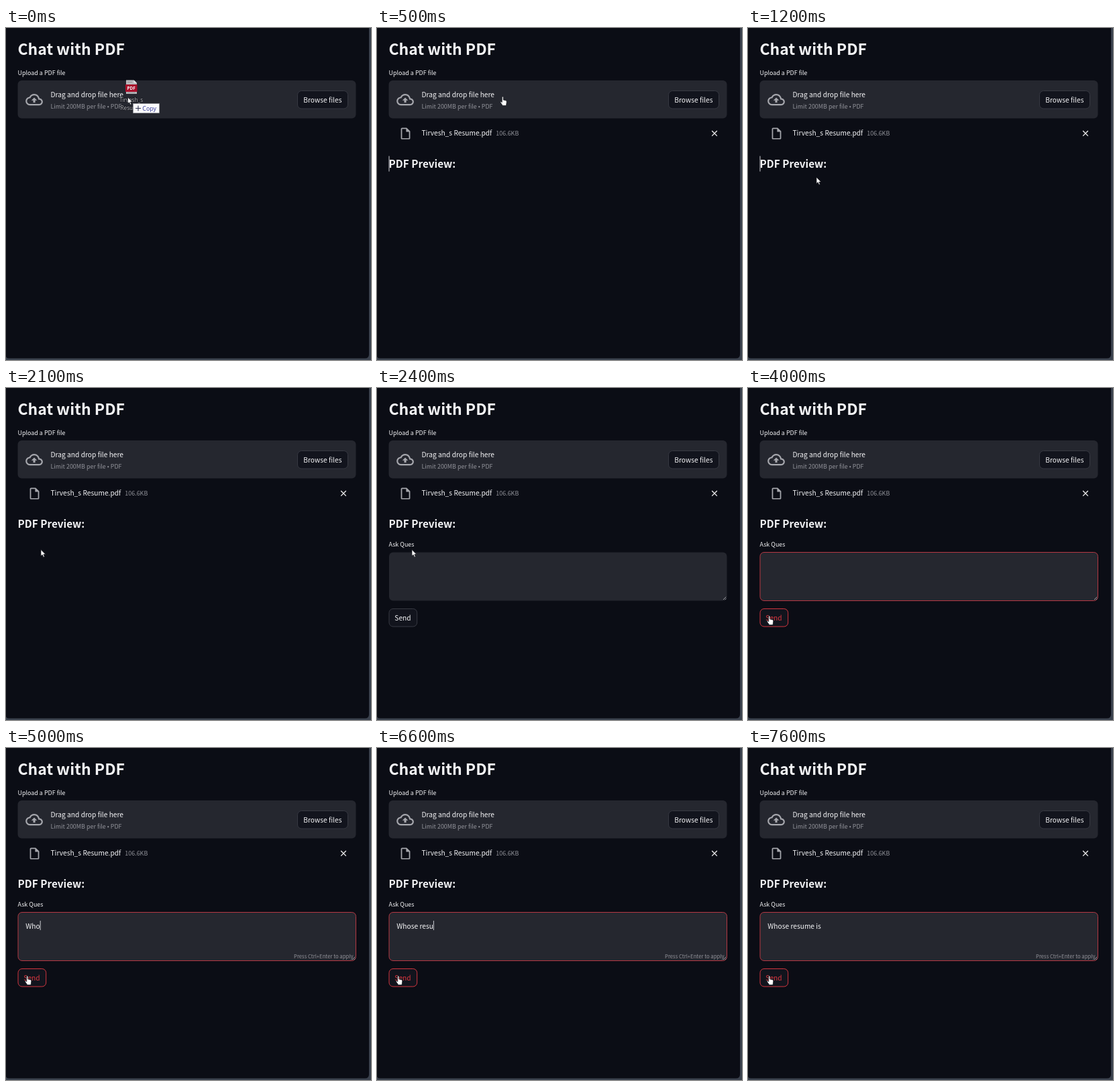
Animation, 544 px wide and 494 px high, one loop 8000 ms. Source, as an HTML page:

```html
<!DOCTYPE html>
<html lang="en">
<head>
<meta charset="utf-8">
<title>Chat with PDF</title>
<style>
  html, body { margin: 0; width: 100%; height: 100%; overflow: hidden; background: #3a414d; }
  svg { display: block; width: 544px; height: 494px; }
  text { font: 10.22px "Noto Sans CJK JP", "Noto Sans CJK SC", "Noto Sans", sans-serif; fill: #f4f4f6; white-space: pre; }
  text.title { font-size: 23px; font-weight: 700; }
  text.head { font-size: 15.35px; font-weight: 700; }
  text.small { font-size: 8.95px; }
  text.hint { font-size: 7.72px; }
  text.sys { font: 8.2px "Open Sans", "Noto Sans", sans-serif; }
  text.dim { fill: #92939a; }
  .icon { fill: #a6a7ad; }
  .panel { fill: #25272f; }
  .button { fill: #12141d; stroke: #373942; }
  .caret { fill: #c9cacf; }
  .focus { stroke: #b43843; }
  .hover .button { stroke: #d0353f; }
  .hover text { fill: #d9363f; }
  .pointer path { fill: #fff; stroke: #15161c; stroke-width: .7; }
</style>
</head>
<body>
<svg viewBox="0 0 544 494">
  <path fill="#0b0d15" d="M0 0H541V485.5Q541 491.5 535 491.5H4Q1 491.5 0 489Z"/>
  <text class="title" x="17.5" y="40">Chat with PDF</text>
  <text class="small" x="17.5" y="70">Upload a PDF file</text>

  <rect class="panel" x="17.5" y="78" width="504" height="56.5" rx="6"/>
  <path class="icon" transform="translate(29.2 93.8) scale(1.07)" d="M19.35 10.04C18.67 6.59 15.64 4 12 4 9.11 4 6.6 5.64 5.35 8.04 2.34 8.36 0 10.91 0 14c0 3.31 2.69 6 6 6h13c2.76 0 5-2.24 5-5 0-2.64-2.05-4.78-4.65-4.96zM19 18H6c-2.21 0-4-1.79-4-4 0-2.05 1.53-3.76 3.56-3.97l1.07-.11.5-.95C8.08 7.14 9.94 6 12 6c2.62 0 4.88 1.86 5.39 4.43l.3 1.5 1.53.11c1.56.1 2.78 1.41 2.78 2.96 0 1.65-1.35 3-3 3zM8 13h2.55v3h2.9v-3H16l-4-4z"/>
  <text x="66.5" y="102.8">Drag and drop file here</text>
  <text class="small dim" x="66.5" y="120">Limit 200MB per file • PDF</text>
  <rect class="button" x="434.5" y="93.5" width="75" height="26.5" rx="6"/>
  <text x="443.3" y="110.6">Browse files</text>

  <g id="file">
    <path class="icon" transform="translate(32.2 146.7) scale(.86)" d="M14 2H6c-1.1 0-2 .9-2 2v16c0 1.1.9 2 2 2h12c1.1 0 2-.9 2-2V8zM6 20V4h7v5h5v11z"/>
    <text x="66.5" y="160.2">Tirvesh_s Resume.pdf</text>
    <text class="small dim" x="177.3" y="160.2">106.6KB</text>
    <path d="M499.2 153l7.6 7.6m0-7.6l-7.6 7.6" stroke="#f4f4f6" stroke-width="1.3"/>
  </g>
  <text id="preview" class="head" x="17.5" y="208">PDF Preview:</text>
  <rect id="headCaret" class="caret" x="17.5" y="190.5" width="1" height="23"/>

  <g id="form">
    <text class="small" x="17.5" y="236.3">Ask Ques</text>
    <rect id="box" class="panel" x="18" y="244.5" width="503.5" height="72" rx="6"/>
    <path d="M516 315l4.2-4.2M518.6 315.2l1.8-1.8" stroke="#b9babf" stroke-width=".8"/>
    <text id="question" x="29.3" y="268.6"></text>
    <rect id="caret" class="caret" y="257" width="1" height="14"/>
    <text id="hint" class="hint dim" x="517.5" y="312.8" text-anchor="end">Press Ctrl+Enter to apply</text>
    <g id="send">
      <rect class="button" x="18" y="328.5" width="41.7" height="26.5" rx="6"/>
      <text x="26.3" y="345.8">Send</text>
    </g>
  </g>

  <g id="drag">
    <path fill="#b9babd" d="M179 77.5H190.5L195 82V98H179Z"/>
    <path fill="#e4e5e7" d="M190.5 77.5V82H195Z"/>
    <path stroke="#85868b" stroke-width=".7" d="M181 80.5h7M181 96.3h12"/>
    <rect x="178" y="84" width="17.5" height="11" fill="#a90f2b"/>
    <text class="sys" x="186.7" y="92.1" text-anchor="middle" style="font-size:6.4px;font-weight:700">PDF</text>
    <g opacity=".68" stroke="#101117" stroke-width="1.4" paint-order="stroke">
      <text class="sys" x="186.5" y="110" text-anchor="middle">Tirvesh_s</text>
      <text class="sys" x="170.5" y="121.8">Resu</text>
    </g>
    <rect x="189.5" y="112.5" width="39" height="14" fill="#fbfbfd" stroke="#8f9097" stroke-width=".6"/>
    <path d="M193 119.5h8M197 115.5v8" stroke="#30344f" stroke-width="1.1"/>
    <text class="sys" x="203.3" y="122.8" style="font-size:8.9px;fill:#2c3192">Copy</text>
  </g>

  <g id="pointer" class="pointer">
    <path id="arrow" d="M0 0V9.6L2.2 7.6 3.8 11.2 5.4 10.5 3.9 7H6.9Z"/>
    <path id="hand" d="M2.8 1.2Q2.8 0 3.8 0T4.8 1.2V5L8.5 5.8Q10 6.2 9.8 8L9 13.5H3.8L.4 8.6Q0 7.4 1.4 7.6L2.8 8.6Z"/>
    <path id="beam" d="M0 0h3M1.5 0v11M0 11h3" style="stroke:#e8e8ea;stroke-width:1"/>
  </g>
</svg>
<script>
const LOOP = 8000;
const el = id => document.getElementById(id);
const show = (id, on) => { el(id).style.display = on ? "" : "none"; };
const latest = (steps, t) => steps.findLast(step => step[0] <= t);

// time, shape, x, y
const pointerSteps = [
  [0, "arrow", 181.5, 103], [100, "hand", 183.5, 102],
  [900, "hand", 176, 106], [1000, "arrow", 150, 140], [1100, "arrow", 122, 176],
  [1200, "arrow", 102, 222], [1300, "arrow", 90, 248], [1400, "arrow", 86, 258.5],
  [2000, "arrow", 67, 249], [2100, "arrow", 52, 240.5],
  [3000, "beam", 44, 272], [3300, "beam", 40, 285], [3400, "beam", 36, 298],
  [3600, "arrow", 31, 321.5], [3700, "arrow", 31, 327], [3800, "hand", 28, 335], [3900, "hand", 28, 339]
];

// time, typed text, caret visible
const typing = [
  [0, "", 0], [3400, "", 1], [4000, "", 0], [4400, "W", 1], [5000, "Who", 1],
  [5600, "Whose ", 1], [5800, "Whose r", 1], [6000, "Whose r", 0], [6600, "Whose resu", 1],
  [6900, "Whose resum", 1], [7200, "Whose resume", 1], [7300, "Whose resume ", 1],
  [7500, "Whose resume i", 1], [7600, "Whose resume is", 0]
];

function draw(t) {
  show("drag", t < 100);
  show("file", t >= 200);
  show("preview", t >= 400);
  show("headCaret", t >= 400 && t < 2000 || t >= 2500 && t < 3000);
  show("form", t >= 2400);
  show("hint", t >= 4400);
  el("box").classList.toggle("focus", t >= 3300);
  el("send").classList.toggle("hover", t >= 3800);

  const [, text, caretOn] = latest(typing, t);
  const question = el("question");
  question.textContent = text;
  show("caret", caretOn);
  if (caretOn) el("caret").setAttribute("x", 29.3 + (text ? question.getComputedTextLength() : 0));

  const [, shape, x, y] = latest(pointerSteps, t);
  for (const name of ["arrow", "hand", "beam"]) show(name, name === shape);
  el("pointer").setAttribute("transform", `translate(${x} ${y})`);
}

function tick() {
  draw(performance.now() % LOOP);
  requestAnimationFrame(tick);
}
tick();
</script>
</body>
</html>
```
